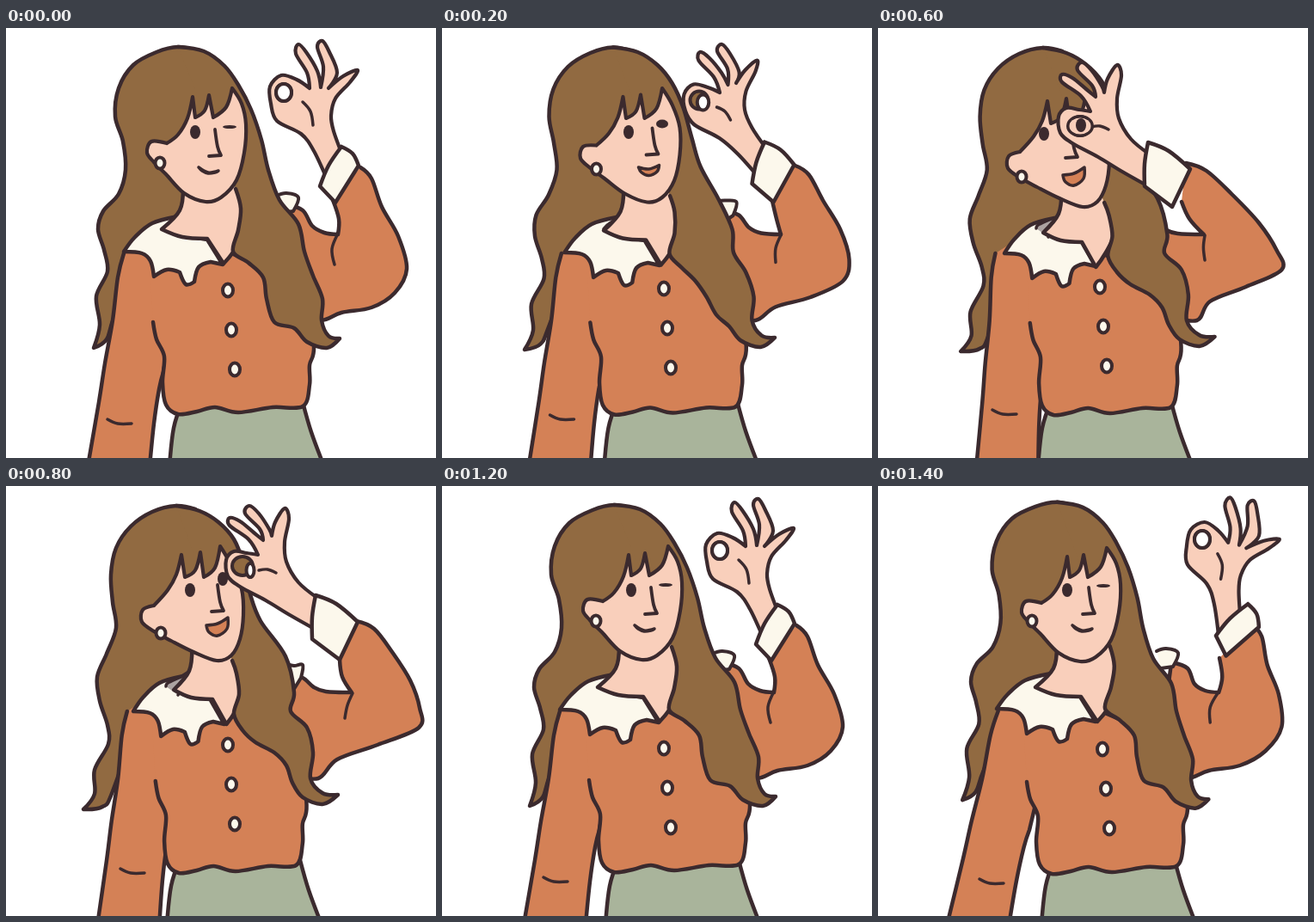
These frames come from a looping animation (500 px wide and 500 px high, 1600 ms). An HTML page with a canvas:

```html
<!DOCTYPE html>
<html lang="en">
<head>
<meta charset="utf-8">
<title>OK gesture</title>
<style>
html, body { margin: 0; height: 100%; overflow: hidden; background: #fff; }
canvas { display: block; width: 500px; height: 500px; }
</style>
</head>
<body>
<canvas id="stage" width="500" height="500"></canvas>
<script>
const HAIR = '#916a41', SKIN = '#f9cfbb', ORANGE = '#d48156', CREAM = '#fcf8ec',
      GREEN = '#a9b49b', GRAY = '#aca3a2', LINE = '#3b2a2e', NONE = 'transparent';

// Moves that carry an outline from one pose to the next
const shift = (dx, dy) => (x, y) => [x + dx, y + dy];
const lean = (k, y0, dx = 0) => (x, y) => [x + k * (y - y0) + dx, y];
const squeeze = (k, x0, dy = 0) => (x, y) => [x0 + (x - x0) * k, y + dy];
const spin = (angle, x0, y0, dx = 0, dy = 0) => (x, y) => {
  const c = Math.cos(angle), s = Math.sin(angle);
  return [x0 + dx + (x - x0) * c - (y - y0) * s, y0 + dy + (x - x0) * s + (y - y0) * c];
};
const still = shift(0, 0);

// A star marks a corner; an outline of two points is an ellipse: centre, radii
const parse = s => s.split(' ').map(p => {
  const [x, y] = p.split(',').map(parseFloat);
  return { x, y, corner: p.endsWith('*') };
});
const pose = (from, next) => typeof next === 'string' ? parse(next) : from.map((p, i) => {
  const [x, y] = from.length === 2 && i ? [p.x, p.y] : next(p.x, p.y);
  return { x, y, corner: p.corner };
});
const halfway = (a, b) => a.map((p, i) =>
  ({ x: (p.x + b[i].x) / 2, y: (p.y + b[i].y) / 2, corner: p.corner }));

// near and away start from the wink, peek starts from near
function part(fill, width, outline, near = still, peek = still, away = still) {
  const wink = parse(outline), close = pose(wink, near);
  return { fill, width, poses: {
    wink, near: close, turn: halfway(wink, close), peek: pose(close, peek), away: pose(wink, away)
  } };
}

const hairPeek = lean(0.035, 200), hairAway = spin(0.035, 295, 260);
const handPeek = shift(-46, 17), handAway = spin(0.293, 323, 75, 54, -13);

// From back to front
const parts = [
  // hair behind the shoulders
  part(HAIR, 4.5,
    '222,27 200,22 175,28 148,43 131,70 127,103 136,132 139,165 131,193 113,213 107,234 114,258 118,283 105,312 109,345 102,372* 117,362 126,335 160,250* 215,215* 260,150',
    '220,27 198,23 170,30 145,47 128,72 122,103 124,135 128,165 117,195 106,222 109,250 118,278 119,300 103,330 103,358 90,376* 112,373 124,355 160,250* 215,215* 260,150',
    hairPeek, hairAway),
  // skirt
  part(GREEN, 4.5, '205,435 195,465 190,510* 370,510* 355,470 345,435', shift(-3, 0), shift(-1, 0)),
  // lowered arm
  part(ORANGE, 4.5,
    '137,262 130,290 124,340 115,390 108,435 95,510* 167,510* 172,460 178,420 183,400* 200,300* 165,245',
    lean(0.03, 300, 5), lean(0.05, 350), lean(-0.07, 300)),
  // blouse
  part(ORANGE, 4.5,
    '171,342 175,362 184,382 182,412 186,438 200,449 222,446 243,441 270,447 310,441 345,440 353,415 353,392 358,370 350,300* 262,262* 165,245',
    squeeze(0.94, 217, 1), shift(3, 0), shift(2, 2)),
  // crease of the lowered arm
  part(NONE, 3.5, '118,455 130,460 146,460', shift(15, -10), shift(0, -1), shift(0, 2)),
  // raised sleeve
  part(ORANGE, 4.5,
    '412,162 425,175 437,208 456,242 466,280 452,308 425,325 390,331 366,340 330,335* 325,205* 345,212 356,230 370,238 386,240* 387,222 380,200',
    '407,157 428,166 449,193 470,226 481,258 480,281 432,301 385,318 363,340 330,335* 328,220* 345,223 358,234 372,239 402,240* 391,222 388,202',
    lean(0.31, 315), lean(-0.17, 300)),
  part(NONE, 3.5, '386,239 379,257 382,275', '403,241 397,255 394,270',
    lean(0.31, 315), lean(-0.17, 300)),
  // collar, far side
  part(CREAM, 4, '315,195 326,192 340,197 334,213* 320,215', '325,207 335,209 345,208 343,223* 335,236',
    shift(-25, 20), shift(9, -3)),
  // collar, near side
  part(CREAM, 4.5,
    '200,219 170,227 150,243 137,260* 158,262 168,271 172,289* 187,281 202,284* 209,298 219,295* 224,278 238,272* 252,275* 234,246* 200,240',
    squeeze(0.92, 275, 2), shift(-1, 0), shift(1, -1)),
  part(GRAY, 3.5, '190,234 200,226 206,222 200,236', '186,233 190,228 212,221 200,243', shift(-2, 0)),
  // neck
  part(SKIN, 4.5, '206,185 202,212 181,234* 205,243 234,245* 253,274* 266,258 290,220* 270,185',
    squeeze(0.85, 275, 3), shift(-3, 1), shift(2, 0)),
  // buttons
  ...[0, 1, 2].map(i => part(CREAM, 4, `${258 + 4 * i},${305 + 46 * i} 6,7.5`,
    shift(0, -4), still, shift(3, 1))),
  // hair over the shoulder
  part(HAIR, 4.5,
    '200,22 230,27 254,44 270,66 285,95 297,130 305,165 318,200 340,228 347,260 357,288 368,315 367,340 375,358 388,361* 373,372 350,365 335,349 312,342 303,315 299,290 282,273 264,260 270,235 273,210 267,187',
    '198,23 225,29 247,42 265,62 276,90 284,126 296,157 325,198 335,240 331,262 350,281 357,310 354,340 368,357 386,359* 368,370 345,362 333,345 326,325 312,310 290,298 275,284 265,265 271,242 268,218 263,203',
    hairPeek, hairAway),
  // face with fringe and ear
  part(SKIN, 4.2,
    '187,134 200,124 211,105 217,80* 220,104* 231,96 236,78* 241,104* 256,92 263,70* 274,88 279,112 277,145 268,177 250,197 232,202 207,192 186,170 172,156 164,145 169,132 187,134',
    '172,139 188,121 198,103 204,80* 208,106* 220,98 226,77* 230,106* 243,95 249,70* 262,92 274,120 276,150 272,178 262,197 245,203 218,193 192,180 172,169 158,158 159,144 172,139',
    shift(-7, 5), shift(3, 2)),
  part(CREAM, 4, '179,157 5.5,6.5', shift(1, 14), shift(-13, 2)),
  part(LINE, 0, '220,121 6,8', shift(-6, 0), shift(-21, 2)),
  // nose and mouth
  part(NONE, 3.8, '243,118 246,138 250,148* 236,149', shift(3, -3), shift(-21, 5), shift(2, 0)),
  part(ORANGE, 3.5, '224,162 235,168 247,166* 243,168 235,169 228,166 224,162',
    '233,162 246,160 258,153* 257,166 246,174 236,170 233,162', shift(-18, 9), shift(2, 0)),
  // raised hand
  part(SKIN, 4.2,
    '375,180 358,143 343,123 315,108 308,88 307,68 320,55 338,60 353,70* 350,52 337,30 340,19 349,28 362,50 366,69* 369,45 362,22 368,15 376,28 385,52 375,70* 392,56 409,49 400,63 383,82 378,102 381,120 392,150',
    '362,168 330,150 302,133 272,117 258,105 256,86 265,76 280,78 293,80* 282,62 260,46 260,37 272,41 288,54 299,63* 295,50 278,32 283,23 294,32 306,50 309,58* 313,42 324,26 329,38 324,65 326,88 340,112 362,130',
    handPeek, handAway),
  part(NONE, 3.5, '345,86 354,97 357,113', '294,98 304,97 314,101', handPeek, handAway),
  // ring of thumb and finger, with the eye that winks or peeks
  part(HAIR, 4, '323,75 9,10', '275,93 12,11', shift(-40, 21), handAway),
  part('#fff', 4, '323,75 9,10', '284,98 4.5,8', '235,114 14,11', handAway),
  part(SKIN, 0, '323,75 0,0', still, '235,114 12.5,9.5'),
  part(LINE, 0, '260,115 8,2', '252,108 6,8', shift(-16, 5), shift(2, 1)),
  // cuff
  part(CREAM, 4.5, '390,138 403,146 410,160* 383,203* 365,184* 375,160 390,138',
    '360,127 384,137 409,158* 388,202* 356,178* 356,152 360,127',
    shift(-46, 6), spin(0.293, 387, 170, 31, -3))
];

const order = ['wink', 'turn', 'near', 'peek', 'near', 'turn', 'wink', 'away'];
const ctx = document.getElementById('stage').getContext('2d');
ctx.lineJoin = ctx.lineCap = 'round';
ctx.strokeStyle = LINE;

// Smooth curve through the points, with sharp bends at corners
function trace(pts) {
  const slope = i => {
    const a = pts[i - 1], b = pts[i + 1];
    return !a || !b || pts[i].corner ? [0, 0] : [(b.x - a.x) / 6, (b.y - a.y) / 6];
  };
  ctx.beginPath();
  if (pts.length === 2) {
    const [c, r] = pts;
    ctx.ellipse(c.x, c.y, r.x, r.y, 0, 0, 7);
    return;
  }
  ctx.moveTo(pts[0].x, pts[0].y);
  for (let i = 1; i < pts.length; i++) {
    const p = pts[i - 1], q = pts[i], [ax, ay] = slope(i - 1), [bx, by] = slope(i);
    ctx.bezierCurveTo(p.x + ax, p.y + ay, q.x - bx, q.y - by, q.x, q.y);
  }
}

function draw() {
  const now = order[Math.floor(performance.now() / 200) % order.length];
  ctx.clearRect(0, 0, 500, 500);
  for (const { fill, width, poses } of parts) {
    trace(poses[now]);
    ctx.fillStyle = fill;
    ctx.fill();
    if (width) {
      ctx.lineWidth = width;
      ctx.stroke();
    }
  }
  requestAnimationFrame(draw);
}
draw();
</script>
</body>
</html>
```
